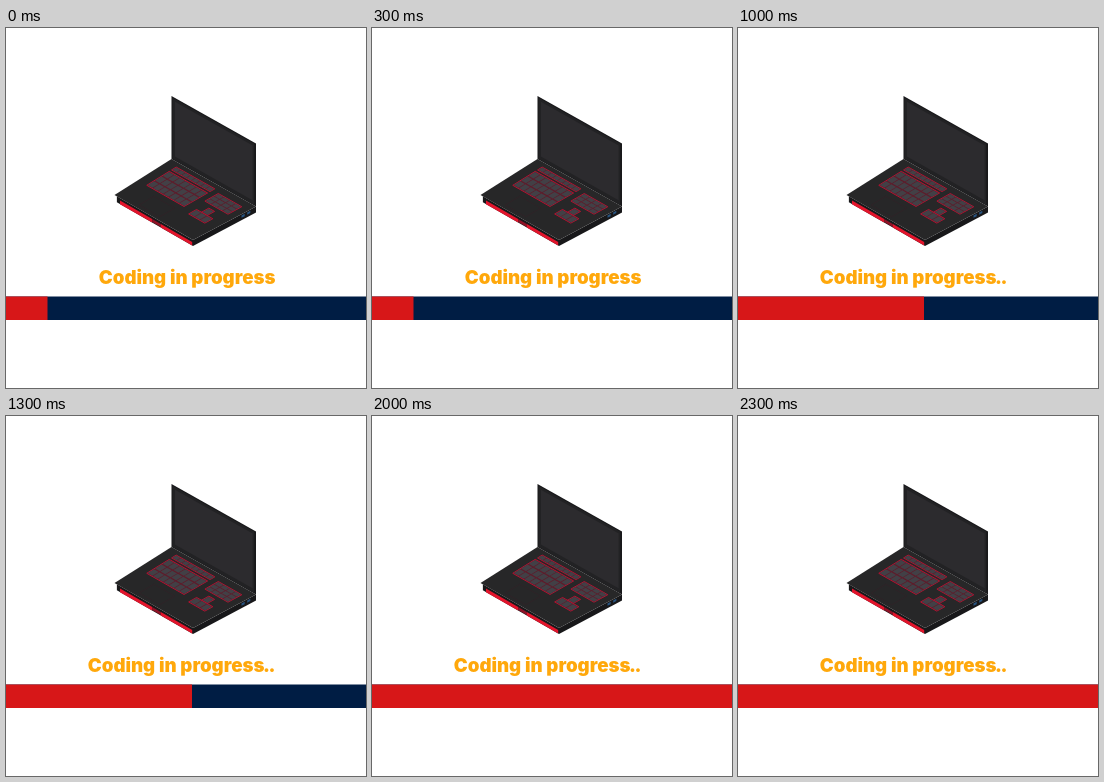
Write an HTML page with a canvas that moves like this. It is 360 px wide and 360 px high and loops after 2.5 s.

```html
<!DOCTYPE html>
<html lang="en">
<head>
<meta charset="utf-8">
<title>Coding in progress</title>
<style>
  html, body { margin: 0; width: 100%; height: 100%; overflow: hidden; background: #fff; }
  canvas { display: block; width: 360px; height: 360px; }
</style>
</head>
<body>
<canvas id="stage" width="360" height="360"></canvas>
<script>
const ctx = document.getElementById('stage').getContext('2d');
const STEP = 500, STEPS = 5, TILT = 18, DOT_ADVANCE = 5.5;
const SCREEN_HEIGHT = 63, CASE_DEPTH = 6;
const progress = [41.5, 112, 186, 269.5, 360];

const BODY = '#272728', EDGE = '#18181a', BEZEL = '#222224', PANEL = '#2c2b2e';
const KEY = '#424046', GAP = '#5e1c2b', GLOW = '#b5102f', RED = '#e2142b', PORT = '#28537f';

// Corners of the keyboard deck.
const back = [165.5, 131], right = [250, 178.5], front = [187, 212], left = [108.5, 167];

const mix = (a, b, t) => [a[0] + (b[0] - a[0]) * t, a[1] + (b[1] - a[1]) * t];
const lower = ([x, y], dy) => [x, y + dy];

// Each surface maps its own (u, v) to stage coordinates.
const deck = (u, v) => mix(mix(back, right, u), mix(left, front, u), v);
const lid = (u, v) => lower(mix(back, right, u), (v - 1) * SCREEN_HEIGHT);
const frontWall = (u, v) => lower(mix(left, front, u), v * CASE_DEPTH);
const sideWall = (u, v) => lower(mix(front, right, u), v * CASE_DEPTH);

function patch(surface, u0, v0, u1, v1, fill, outline) {
  ctx.beginPath();
  for (const [u, v] of [[u0, v0], [u1, v0], [u1, v1], [u0, v1]]) {
    ctx.lineTo(...surface(u, v));
  }
  ctx.closePath();
  ctx.fillStyle = fill;
  ctx.fill();
  if (outline) {
    ctx.strokeStyle = outline;
    ctx.stroke();
  }
}

function keys(u0, v0, u1, v1, columns, rows) {
  patch(deck, u0, v0, u1, v1, GAP, GLOW);
  const du = (u1 - u0) / columns, dv = (v1 - v0) / rows;
  for (let i = 0; i < columns * rows; i++) {
    const u = u0 + (i % columns) * du, v = v0 + Math.floor(i / columns) * dv;
    patch(deck, u + du * 0.06, v + dv * 0.08, u + du * 0.94, v + dv * 0.92, KEY);
  }
}

function drawBase() {
  patch(frontWall, 0.03, 0, 1, 1, EDGE);
  patch(sideWall, 0, 0, 1, 1, EDGE);
  patch(deck, 0, 0, 1, 1, BODY);
  patch(frontWall, 0.07, 0.4, 0.48, 1, RED);
  patch(frontWall, 0.48, 0.4, 0.59, 0.9, '#8f1226');
  patch(frontWall, 0.59, 0.4, 0.99, 1, RED);
  for (const u of [0.77, 0.86]) patch(sideWall, u, 0.2, u + 0.05, 0.6, PORT);

  keys(0.11, 0.08, 0.57, 0.16, 8, 1);
  keys(0.11, 0.20, 0.57, 0.59, 7, 3);
  keys(0.64, 0.12, 0.92, 0.34, 4, 3);
  keys(0.74, 0.41, 0.81, 0.53, 1, 1);
  keys(0.68, 0.53, 0.88, 0.66, 3, 1);
  patch(deck, 0.27, 0.69, 0.53, 0.94, BODY, '#2e2327');
}

function drawLid() {
  patch(lid, 0, 0, 1, 1, EDGE);
  patch(lid, 0.01, 0.02, 0.98, 0.99, BEZEL);
  patch(lid, 0.04, 0.06, 0.96, 0.93, PANEL);
}

function drawLaptop(degrees) {
  ctx.save();
  ctx.translate(180, 143);
  ctx.rotate(degrees * Math.PI / 180);
  ctx.translate(-180, -143);
  drawBase();
  drawLid();
  ctx.restore();
}

function drawCaption(dots) {
  const end = 269.5 - dots * DOT_ADVANCE;
  ctx.font = '900 18.7px Inter, sans-serif';
  ctx.fillStyle = '#ffa80b';
  ctx.textAlign = 'right';
  ctx.fillText('Coding in progress', end, 255.5);
  for (let i = 1; i <= dots; i++) ctx.fillText('.', end + i * DOT_ADVANCE, 255.5);
}

function drawBar(width) {
  ctx.fillStyle = '#001d44';
  ctx.fillRect(0, 268.5, 360, 23.5);
  ctx.fillStyle = '#d71718';
  ctx.fillRect(0, 268.5, width, 23.5);
}

function render(time) {
  const step = Math.floor(time / STEP) % STEPS;
  ctx.fillStyle = '#fff';
  ctx.fillRect(0, 0, 360, 360);
  drawLaptop(-TILT * Math.sin(step * Math.PI / 2));
  drawCaption(3 - Math.abs(step - 3));
  drawBar(progress[step]);
}

const start = performance.now();
function tick() {
  render(performance.now() - start);
  requestAnimationFrame(tick);
}
tick();
</script>
</body>
</html>
```
